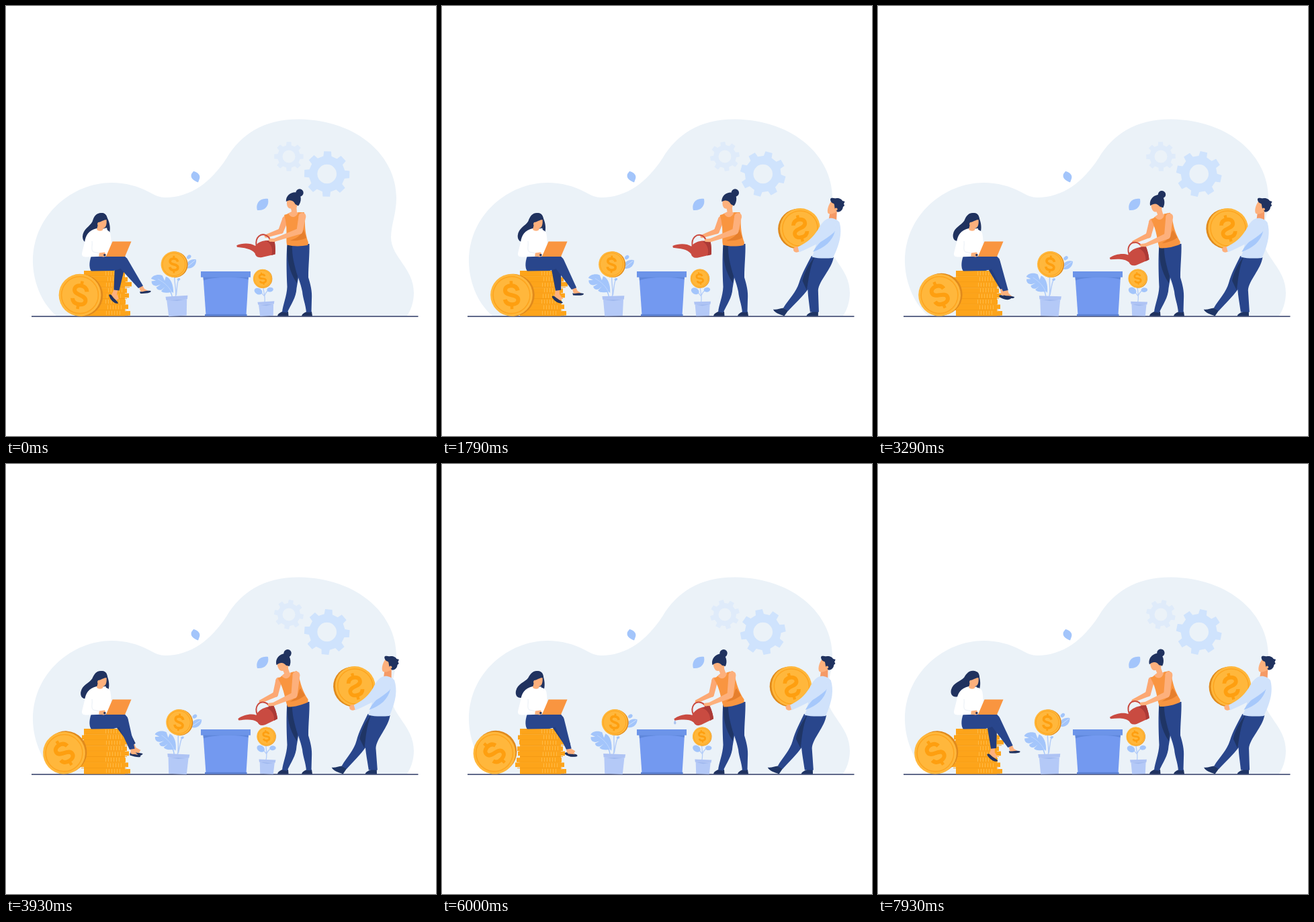
Animation, 640 px wide and 640 px high, one loop 8000 ms. Source, as an HTML page with a canvas:

```html
<!DOCTYPE html>
<html lang="en">
<head>
<meta charset="utf-8">
<title>Growing savings</title>
<style>
html, body { margin: 0; width: 100%; height: 100%; overflow: hidden; background: #fff; }
canvas { display: block; width: 640px; height: 640px; }
</style>
</head>
<body>
<canvas id="stage"></canvas>
<script>
const canvas = document.getElementById('stage');
const ctx = canvas.getContext('2d');
const dpr = Math.max(1, window.devicePixelRatio || 1);
canvas.width = canvas.height = 640 * dpr;

const LOOP = 8000, TAU = Math.PI * 2, DEG = Math.PI / 180;
const NAVY = '#20325f', TROUSERS = '#29468c', SHADE = '#1f3565', SKIN = '#fdb07c';
const LEAF = '#a3c5fb', RED = '#c94b41', ORANGE = '#f99540';

const mix = (a, b, k) => a + (b - a) * k;
const clamp = v => Math.min(1, Math.max(0, v));
const smooth = v => { v = clamp(v); return v * v * (3 - 2 * v); };
const wave = t => Math.cos(TAU * t / 9600);

function shape(d, fill) {
  ctx.fillStyle = fill;
  ctx.fill(new Path2D(d));
}
function line(d, color, width) {
  ctx.strokeStyle = color;
  ctx.lineWidth = width;
  ctx.stroke(new Path2D(d));
}
function disc(x, y, r, fill) {
  ctx.fillStyle = fill;
  ctx.beginPath();
  ctx.arc(x, y, r, 0, TAU);
  ctx.fill();
}
function oval(x, y, rx, ry, deg, fill) {
  ctx.fillStyle = fill;
  ctx.beginPath();
  ctx.ellipse(x, y, rx, ry, deg * DEG, 0, TAU);
  ctx.fill();
}
function turned(x, y, deg, draw) {
  ctx.save();
  ctx.translate(x, y);
  ctx.rotate(deg * DEG);
  ctx.translate(-x, -y);
  draw();
  ctx.restore();
}

// Tapered limb through joints given as [x, y, radius]
function limb(joints, fill) {
  joints.forEach(([x, y, r], i) => {
    disc(x, y, r, fill);
    if (!i) return;
    const [px, py, pr] = joints[i - 1];
    const a = Math.atan2(y - py, x - px) + Math.PI / 2;
    const c = Math.cos(a), s = Math.sin(a);
    ctx.beginPath();
    ctx.moveTo(px + c * pr, py + s * pr);
    ctx.lineTo(x + c * r, y + s * r);
    ctx.lineTo(x - c * r, y - s * r);
    ctx.lineTo(px - c * pr, py - s * pr);
    ctx.fill();
  });
}

function coin(x, y, r, deg, edge, tilt = 0, mirror = 1) {
  ctx.save();
  ctx.translate(x, y);
  ctx.rotate(deg * DEG);
  ctx.scale(mirror * r / 31.5, r / 31.5);
  disc(edge, 0.6, 31.5, '#e08a1c');
  disc(0, 0, 31.5, '#ffb73c');
  ctx.strokeStyle = '#fda51f';
  ctx.lineWidth = 1.6;
  ctx.beginPath();
  ctx.arc(0, 0, 27.5, 0, TAU);
  ctx.stroke();
  ctx.rotate(tilt * DEG);
  line('M9.5-6.5C8.3-12 4-14-.5-14C-6-14-9.3-11.3-9.3-7.2C-9.3-2.5-5-1.2 0 0C5 1.2 9.8 2.6 9.8 7.2C9.8 11.6 6 14 .5 14C-5 14-9 12-10 6.5', '#fe9f10', 6);
  line('M0-21V-13M0 13V21', '#fe9f10', 4.5);
  ctx.restore();
}

function gear(x, y, outer, inner, hole, deg, fill) {
  ctx.fillStyle = fill;
  ctx.beginPath();
  for (let i = 0; i < 8; i++) {
    const mid = (deg + i * 45 - 90) * DEG;
    [[inner, -13], [outer, -9], [outer, 9], [inner, 13]].forEach(([r, off]) =>
      ctx.lineTo(x + r * Math.cos(mid + off * DEG), y + r * Math.sin(mid + off * DEG)));
  }
  ctx.closePath();
  ctx.moveTo(x + hole, y);
  ctx.arc(x, y, hole, 0, TAU, true);
  ctx.fill('evenodd');
}

function backdrop(t) {
  shape('M75 461C50 440 40 405 40 380C40 310 100 263 157 263C178 263 196 268 213 277C222 282 229 285 237 285C275 285 305 262 328 227C350 190 385 168 437 168.5C525 170 581 225 581 285C581 310 573 325 573 345C574 375 607 390 607 427C607 440 603 452 597 461Z', '#ebf2f8');
  const seconds = t / 1000;
  gear(421, 224, 22, 17, 9.5, -55 * seconds, '#dfebfa');
  gear(477.7, 250, 34, 27, 14.3, 58 * seconds + 1.5, '#cfe3fd');
  shape('M279 246C285 247 290 252 288 257L286 262.5C279 260 274 256 276 250Z', LEAF);
  shape('M390 287C392 297 386 305 374 304C371 295 377 285 390 287Z', LEAF);
  line('M38 462H613.5', '#2b3763', 1.6);
}

function stack() {
  const left = [116, 113, 115, 112, 113, 111, 109, 116];
  const right = [177, 181, 187, 180, 183, 178, 182, 185];
  left.forEach((x, i) => {
    const y = 394 + i * 8.4, w = right[i] - x;
    ctx.fillStyle = '#fda41a';
    ctx.fillRect(x, y + (i % 2) * 1.2, w, 6.6);
    ctx.fillRect(116, y, 61, 8.6);
    ctx.fillStyle = '#f39813';
    ctx.fillRect(x + 3, y + 7.6, w - 6, 0.8);
    ctx.fillStyle = '#ffbd4c';
    for (let j = 0; j < 6; j++) ctx.fillRect(148 + j * 4 + (i * 3) % 5, y + 1, 0.9, 6);
  });
}

function rollingCoin(t) {
  const x = 94 + 16 * Math.cos(TAU * t / 12000);
  const roll = (x - 110) / 32 / DEG;
  coin(x, 430.2, 31.4, roll, 2.8, 10);
}

function seatedWoman(t) {
  const swing = (1 - wave(t)) / 2;
  turned(142, 318, 13.5 * t / 7930, () =>
    shape('M142 308C134 308 131 313 128.5 321C125 328 114.5 332 114 343C114 349 117 352 121 352C129 352 136 344 138.5 333L150 330C151 334 152 337 154 338C156 330 154 322 151 316C149 309 146 308 142 308Z', NAVY));

  turned(170, 386, -43 * swing, () => {
    shape('M161.5 420L167 421L165 429L168 436L163 438L157 430Z', SKIN);
    shape('M162 384C168 380 177 384 176 392L168.5 423.5L160.5 422.5Z', '#243d7c');
    shape('M153 430C155 428 157 430 159 433C162 437 166 439 167 442.5C162 444 155 438 153 430Z', NAVY);
  });
  turned(174, 380, 19 * swing, () => {
    shape('M197 416L202 414L206 421L212 424L203 427L200 424Z', SKIN);
    shape('M166 386C166 374 176 369 181 377L204 416.5L197 420Z', TROUSERS);
    shape('M199 425C203 426.5 208 422.5 215.5 424C217 427 208 428 200 428Z', NAVY);
  });
  shape('M127 372C123 382 124 392 127 394.5L160 394C170 392 180 387 181 378L177 372.5Z', TROUSERS);

  shape('M135 331C123 334 118.5 341 117 352L113 368C112.5 373 116 373.5 120 373.5L151 372.5C158 366 157 345 155 338C153 333 148 333 145 332Z', '#fff');
  line('M128 350C129 357 126 363 130 366L139 368', '#e3eaf3', 0.8);
  shape('M139 367.5L147 366.5L149 371L146 373.5L138 372.5Z', SKIN);
  shape('M135.5 321C140 314 148 314 149.5 318C150.3 324 149 330.5 144.5 331L144 333.5C141 335.5 137 335 135 332.5L136.5 327Z', SKIN);
  shape('M131 324C131 313 136 308 143 308.3C148 308.8 150.5 313 150.5 318C146 317.5 142 321.5 137 322C135 325 135.5 328 134 331Z', NAVY);
  shape('M158.5 350.5H186.5L177 373H148.8Z', ORANGE);
  disc(146.8, 370.6, 1.7, NAVY);
}

function smallPot(x, top, halfTop, halfBase, rim) {
  const w = halfTop - 1.5;
  shape(`M${x - w} ${top + rim}H${x + w}L${x + halfBase} 461.3H${x - halfBase}Z`, '#b4c9f7');
  shape(`M${x - w} ${top + rim}H${x + w}L${x} ${top + rim + 2}Z`, '#9fb8ee');
  shape(`M${x - halfTop} ${top}H${x + halfTop}L${x + halfTop - 0.7} ${top + rim}H${x - halfTop + 0.7}Z`, '#aec3f4');
}

function plants(t) {
  const lean = -3.1 * wave(t);
  turned(255.5, 461, lean, () => {
    line('M254 433C256 422 253 412 254 402M255 430C257 420 257 411 260 407', '#b4cdf8', 1.5);
    line('M249 433C248 422 238 413 230 406', LEAF, 1.4);
    shape('M251 427C252 415 248 404 241 402L239 408L236 400C230 397 221 399 219 404L226 407L219.5 407.5C219 412 222 415 227 415L233 413L226 417C227 421 230 422 234 421L239 417L233 423C236 427 244 426 249 425Z', LEAF);
    line('M229 405C238 410 246 418 249 427', '#c3d9fd', 0.8);
    shape('M271 390C273 380 281 377 287.5 379C288 387 281 393 273 391Z', LEAF);
    line('M271 391L286 380', '#d9e7fd', 0.8);
    oval(277, 374.5, 3.6, 2.6, -40, LEAF);
    oval(260, 407, 2.4, 1.7, -20, LEAF);
    smallPot(255.5, 431.7, 16.5, 13.3, 5.3);
    coin(254, 384.4, 19.3, 0, 2.4, 3);
  });
  turned(388, 461, lean, () => {
    line('M386 441C388 431 385 425 385 418M386.5 432C382 426 380 425 376 424M386.5 431C389 425 391 424 395 422', '#b4cdf8', 1.3);
    oval(377.5, 424, 6.2, 4.6, 30, LEAF);
    oval(395.2, 422.4, 4.8, 3.4, -5, LEAF);
    smallPot(388, 440, 12.5, 9.8, 4.2);
    coin(384.8, 405.5, 14, 0, 1.2, -10);
  });
}

function bigPot() {
  shape('M293.5 403H361L357.5 460H297.5Z', '#7399f0');
  shape('M293.5 403H361L360.6 407C345 402.5 310 402.5 294 408.5Z', '#5f87dc');
  shape('M290 395H364V403.8H290Z', '#6c94e9');
  shape('M296 458.8H358.6V461.6H296Z', '#5a80d2');
}

function drops(t) {
  for (const start of [4100, 5000, 5900]) {
    const u = (t - start) / 420;
    if (u < 0 || u > 1) continue;
    const y = 381.5 + 18 * u * u + 4 * u;
    shape(`M346.6 ${y - 2.5}C349 ${y + 1} 349 ${y + 4} 346.8 ${y + 4}C344.6 ${y + 4} 344.6 ${y + 1} 346.6 ${y - 2.5}Z`, '#a9c3ee');
  }
}

function wateringWoman(t) {
  const k = smooth((t - 1500) / 2500) - smooth((t - 7430) / 2500);
  const joint = (x0, y0, x1, y1, r) => [mix(x0, x1, k), mix(y0, y1, k), r];

  shape('M404 461.5C405 456.5 411 455 416 453.5L420 455L420.5 461.5Z', NAVY);
  shape('M440 461.5C441 457 446 456 450 453.5L455 455L456 461.5Z', NAVY);
  shape('M418.5 354C417 375 417.5 395 418.5 418C418 432 412 445 411 455.5L418.5 456.5C424 444 432 434 432.5 420L440 375Z', TROUSERS);
  shape('M424 354H451.5C452 370 450 385 450 404C453 414 456 424 455 437L454.5 456H447C446 444 442 436 441 425C438 410 434 405 432 390Z', TROUSERS);
  shape('M419 354L426 355C425 372 430 388 434 402L432.5 412C422 396 417 376 419 354Z', SHADE);

  limb([joint(416, 317, 406, 322, 4.6), joint(409, 335, 401, 343, 4), joint(387, 342.5, 379, 353.5, 2.4)], '#fca873');

  ctx.save();
  ctx.translate(2 * k, 13.3 * k);
  turned(386, 361, -13 * k, () => {
    line('M372.5 356C371 343 380 339 385 340.5C390 342 393 346 393.5 351', RED, 2);
    shape('M371 357C375 351 384 348.5 391 349L399 348C400.5 352 401.5 364 400.5 369.5L381 374C374 375 371.5 372 370.5 368C365 361 354 360 343.8 358.8L343.3 356.2C352 352.5 364 352.5 371 357Z', RED);
    shape('M388 350L399 348C400.5 352 401.5 364 400.5 369.5L395 371C398 363 395 354 388 350Z', '#ab3a36');
  });
  ctx.restore();

  ctx.save();
  ctx.translate(0, 2 * k);
  turned(435, 352, -14 * k, () => {
    shape('M423 296L432 296L433 307L444 307L440 318L417 317L419 309L425 306Z', SKIN);
    shape('M414 311L420.5 309C424 316 432 316 435 307L443.5 307C447 315 442 330 450 352L449 356C439 358 427 358 418 355.5C416 345 420 330 414 311Z', ORANGE);
    shape('M440 336C438 342 432 346 423 349C432 350 442 348 447 345L443 333Z', '#e67f2c');
    shape('M418.5 288C417 295 418.5 301 423 301.5L432 301L436 290L428 284Z', SKIN);
    shape('M416.8 291C416.5 280.5 427 275.5 434 278C440.5 281 440 292 435 297.5L430.5 295C428 290 424 287.5 416.8 291Z', NAVY);
    disc(437, 278, 5.7, NAVY);
  });
  ctx.restore();
  limb([joint(441, 313, 432, 314, 5.4), joint(437, 335, 429, 344, 4.6), joint(399, 348.5, 398, 357.5, 2.5), joint(393, 348.5, 392, 358, 2.2)], SKIN);
}

function carrier(t) {
  const off = 160 * (1 - clamp(t / 2300)) ** 2;
  const sway = 5.3 * wave(t) / 163;
  ctx.save();
  ctx.translate(off, 0);
  ctx.transform(1, 0, -sway, 1, sway * 461, 0);

  shape('M485 451.5C490 452.5 495 450 500 449.5L507.5 453L501.5 461.5C496 459 487 457 485 451.5Z', SHADE);
  shape('M534.5 461.5C536 457 542 456 546 453.5L552 455L552 461.5Z', SHADE);
  shape('M541 372L562 374C553 392 545 408 537 421C528 433 517 443 507 454L500 449.5C508 436 519 426 523 412C527 398 535 384 541 372Z', TROUSERS);
  shape('M548 372L574 374C571 392 553 408 551.5 423L553 455.5H540C538 438 534 420 537 406Z', TROUSERS);
  shape('M546 373C537 384 530 398 528 409L534.5 423C537 408 538 391 546 373Z', SHADE);

  shape('M568 305L578 304L577.5 320L566 318Z', '#f59a66');
  shape('M567 316C572 315 579 318 582 322C586 336 584 352 573 375C562 376 551 376 541.5 373.5C546 365 548 355 549 345C550 335 556 320 567 316Z', '#d0e2fb');
  coin(523.4, 331, 29.9, 0, 3, 12, -1);
  shape('M543 366C552 350 564 342 575.5 335C572 350 560 360 543 366Z', '#a6c8fb');
  shape('M514 360.5C517 357.5 521 358 524 359.5L523 365.5C518 368 513 366.5 514 360.5Z', SKIN);
  shape('M566 316C576 320 579 330 574 337C562 348 543 358 522.5 366.5L520.5 358.5C535 352 543 344 550 333C555 324 559 318 566 316Z', '#d0e2fb');

  shape('M569 291C565.5 296 563 303 564.5 308C566 310.5 570 309.5 572 309L579 306L579 295Z', SKIN);
  shape('M568 287.5C568.5 284.5 572 286 576 286.2C580 285.2 585 287 586 290L589.6 291L588 294.5L589.2 297L587 299C586.5 304 582.5 307 578.5 306.5L575 302C574 298 574.5 295 573 294C570.5 293.5 568 291 568 287.5Z', NAVY);
  disc(576.8, 302.5, 2, SKIN);
  ctx.restore();
}

function frame(now) {
  const t = now % LOOP;
  ctx.setTransform(dpr, 0, 0, dpr, 0, 0);
  ctx.fillStyle = '#fff';
  ctx.fillRect(0, 0, 640, 640);
  backdrop(t);
  stack();
  rollingCoin(t);
  seatedWoman(t);
  plants(t);
  bigPot();
  drops(t);
  wateringWoman(t);
  carrier(t);
}

const begin = performance.now();
function tick() {
  frame(performance.now() - begin);
  requestAnimationFrame(tick);
}
tick();
</script>
</body>
</html>
```
